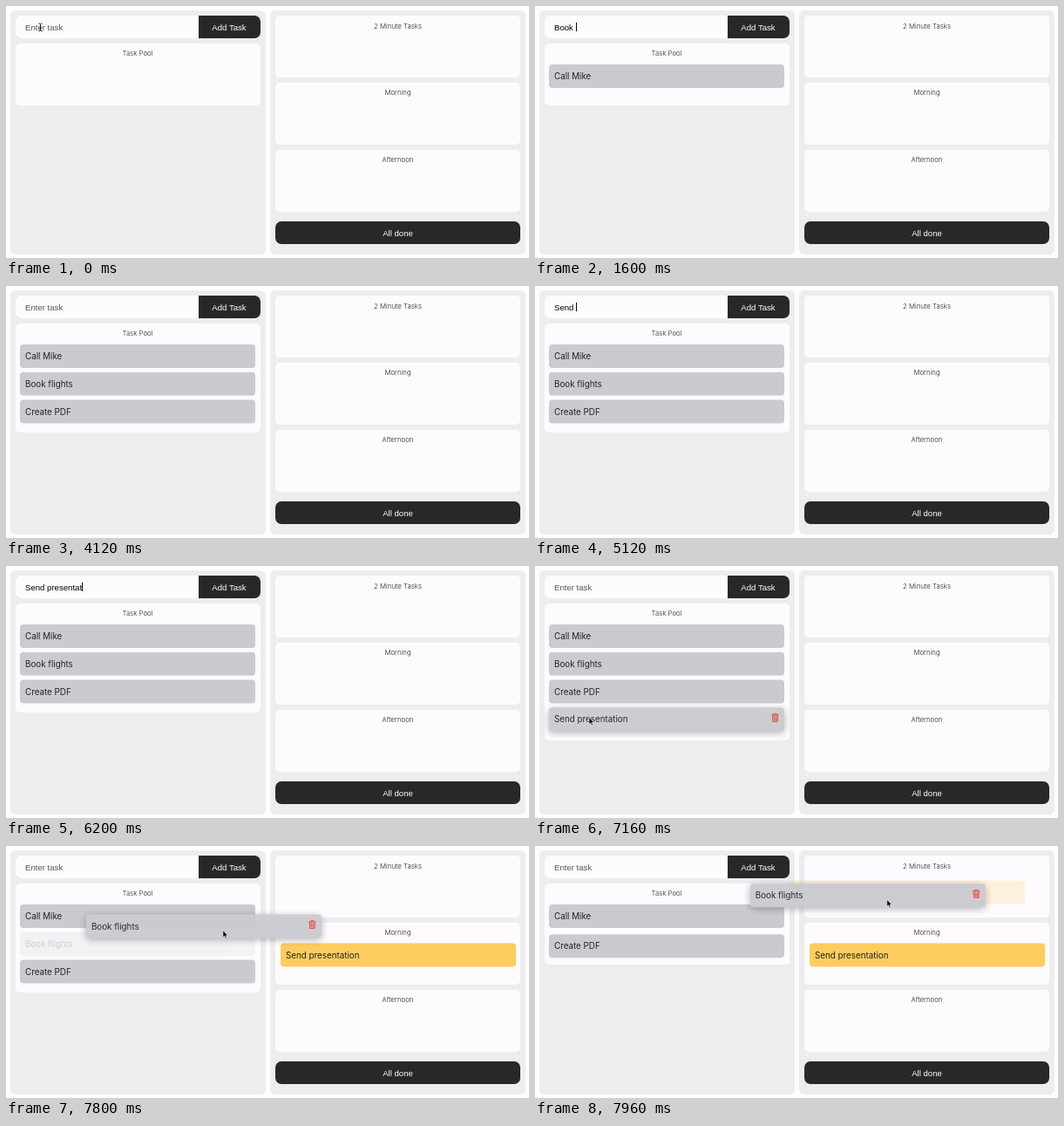
Write an HTML page that moves like this. It is 600 px wide and 289 px high and loops after 8000 ms.

```html
<!DOCTYPE html>
<html lang="en">
<head>
<meta charset="utf-8">
<title>Task planner</title>
<style>
  html, body { margin: 0; width: 100%; height: 100%; overflow: hidden; background: #fdfcfe; }
  #stage { position: relative; width: 600px; height: 289px; overflow: hidden; font-family: Inter, "Open Sans", sans-serif; }
  #stage > * { position: absolute; box-sizing: border-box; }
  .panel { top: 5px; width: 293px; height: 280px; border-radius: 6px; background: #eeecef; }
  .box { width: 281px; height: 71px; border-radius: 5px; background: #fdfbfe; padding-top: 6.5px;
    text-align: center; font-size: 7.8px; line-height: 10px; font-weight: 300; color: #2a272a; }
  .field, .button { height: 26px; display: flex; align-items: center; white-space: pre;
    font: 9.6px "Liberation Sans", Arial, sans-serif; }
  .field { left: 10.5px; top: 11px; width: 211px; padding-left: 11.5px; background: #fdfbfe; border-radius: 7px 0 0 7px; color: #000; }
  .button { justify-content: center; background: #2a272a; color: #fff; }
  #caret { width: 1px; height: 10px; margin-right: -1px; background: #000; }
  #hint { color: #555; }
  .task { left: 0; top: 0; width: 270px; height: 26.5px; padding-left: 6px; display: flex; align-items: center;
    border-radius: 4px; background: #cacbd0; color: #242226; font-size: 9.8px; white-space: pre; }
  .task.planned { background: #fccd5e; }
  .task.ghost { opacity: .2; }
  .task svg { position: absolute; left: 254.5px; top: 5.5px; display: none; }
  .task.hover svg, #drag svg { display: block; }
  #drag { opacity: .95; box-shadow: 0 2px 9px rgba(0, 0, 0, .3); z-index: 2; }
  #pointer, #beam { left: 0; top: 0; z-index: 3; overflow: visible; }
</style>
</head>
<body>
<div id="stage">
  <div class="panel" style="left:5px"></div>
  <div class="panel" style="left:303px"></div>
  <div class="field"><span id="typed"></span><i id="caret"></i><span id="hint">Enter task</span></div>
  <div class="button" style="left:220.5px;top:11px;width:71px;border-radius:0 7px 7px 0">Add Task</div>
  <div class="box" id="pool" style="left:10.5px;top:42.5px">Task Pool</div>
  <div class="box" style="left:309px;top:11px">2 Minute Tasks</div>
  <div class="box" style="left:309px;top:87.5px">Morning</div>
  <div class="box" style="left:309px;top:164.5px">Afternoon</div>
  <div class="button" style="left:309px;top:247px;width:281px;border-radius:7px">All done</div>
  <svg id="beam" width="6" height="10"><path d="M-2-4.5Q0-4.5 0-3V3Q0 4.5-2 4.5M2-4.5Q0-4.5 0-3V3Q0 4.5 2 4.5M-1 1H1" fill="none" stroke="#222" stroke-width=".9"/></svg>
  <svg id="pointer" width="8" height="10"><path d="M0 0V8L1.8 6.4 3 9.2 4.4 8.6 3.2 5.9H5.7Z" fill="#000" stroke="#fff" stroke-width=".6"/></svg>
</div>
<script>
const LOOP = 8000, FLIP = 150;
const $ = id => document.getElementById(id);
const stage = $("stage");
const TRASH = `<svg width="9" height="11" viewBox="0 0 9 11" fill="none" stroke="#e8463c">
  <path d="M.3 2.3H8.7M3 2V.8H6V2"/><path d="M1.4 2.5L1.8 10H7.2L7.6 2.5" fill="#e8463c" fill-opacity=".35"/><path d="M3.4 4V8.6M5.6 4V8.6" stroke-width=".8"/></svg>`;

const slot = i => [16, 67 + 31.8 * i];
const TWO_MINUTE = [315, 35], MORNING = [315, 111.5];

// born: added to pool; moved: reorder time; grab/drop: drag span
const tasks = [
  { text: "Call Mike", born: 1000, from: slot(0) },
  { text: "Book flights", born: 2640, from: slot(1), to: TWO_MINUTE, moved: 7860, grab: 7720, drop: LOOP },
  { text: "Create PDF", born: 4000, from: slot(2), to: slot(1), moved: 7860 },
  { text: "Send presentation", born: 6640, from: slot(3), to: MORNING, moved: 7365, grab: 7160, drop: 7540 }
];

// first key, last key, characters
const typing = [
  [120, 800, "Call Mike"],
  [1360, 1600, "Book "], [1960, 2240, "flight"], [2440, 2440, "s"],
  [2840, 3240, "Create"], [3320, 3320, " "], [3520, 3520, "P"], [3680, 3800, "DF"],
  [4480, 5120, "Send "], [5240, 5360, "pr"], [5560, 5920, "esen"], [6080, 6200, "tat"], [6320, 6480, "ion"]
];
const keys = typing.flatMap(([a, b, word]) =>
  [...word].map((char, i) => ({ char, at: a + (b - a) * i / Math.max(1, word.length - 1) })));
const caretOff = [[0, 120], [1200, 1360], [1800, 1960], [2760, 2840], [4040, 4200], [4400, 4480], [6720, LOOP]];

// time, x, y of the mouse
const path = [
  [6880, 39.5, 24.5], [7120, 62, 173.5], [7180, 62, 173.5], [7365, 310, 124], [7440, 374, 117.5],
  [7540, 392, 117], [7690, 173, 117], [7730, 173, 117], [7860, 312, 80], [7960, 403.5, 61.5], [8000, 414, 59]
];

const ease = u => 1 - Math.pow(1 - Math.min(1, Math.max(0, u)), 2.3);
const mix = (a, b, u) => a + (b - a) * u;
const place = (el, [x, y]) => { el.style.transform = `translate(${x}px,${y}px)`; };
const show = (el, on) => { el.style.visibility = on ? "visible" : "hidden"; };

function addTask(text) {
  const el = document.createElement("div");
  el.className = "task";
  el.innerHTML = `<span>${text}</span>${TRASH}`;
  return stage.appendChild(el);
}
for (const task of tasks) task.el = addTask(task.text);
const drag = addTask("");
drag.id = "drag";

function mouseAt(t) {
  if (t <= path[0][0]) return path[0].slice(1);
  const i = path.findIndex(p => p[0] >= t);
  const [a, b] = [path[i - 1], path[i]];
  const u = (t - a[0]) / (b[0] - a[0]);
  return [mix(a[1], b[1], u), mix(a[2], b[2], u)];
}

function positionAt(task, t) {
  if (!task.to) return task.from;
  const u = ease((t - task.moved) / FLIP);
  return task.from.map((v, i) => mix(v, task.to[i], u));
}

function drawField(t) {
  const cleared = Math.max(0, ...tasks.map(k => k.born).filter(b => b <= t));
  const text = keys.filter(k => k.at > cleared && k.at <= t).map(k => k.char).join("");
  $("typed").textContent = text;
  $("hint").style.display = text ? "none" : "";
  show($("caret"), !caretOff.some(([a, b]) => t >= a && t < b));
}

function drawTasks(t, mouse) {
  const held = tasks.find(k => t >= k.grab && t < k.drop);
  let pooled = 0;
  for (const task of tasks) {
    const { el } = task, born = t >= task.born;
    const pos = positionAt(task, t);
    const planned = task.grab && t >= task.moved;
    const dx = mouse[0] - pos[0], dy = mouse[1] - pos[1];
    const over = t > path[0][0] && dx > 0 && dx < 270 && dy > 0 && dy < 26.5;
    if (born && !planned) pooled++;
    el.style.display = born ? "" : "none";
    el.classList.toggle("planned", !!planned);
    el.classList.toggle("ghost", task === held);
    el.classList.toggle("hover", !held && over);
    place(el, pos);
  }
  $("pool").style.height = Math.max(71, 30 + 31.8 * pooled) + "px";
  show(drag, held);
  if (held) {
    const start = mouseAt(held.grab);
    drag.firstChild.textContent = held.text;
    place(drag, held.from.map((v, i) => v + mouse[i] - start[i]));
  }
}

function render(t) {
  const mouse = mouseAt(t);
  const active = t < 120 || t >= path[0][0];
  const inField = mouse[1] < 37;
  drawField(t);
  drawTasks(t, mouse);
  show($("beam"), active && inField);
  show($("pointer"), active && !inField);
  place($("beam"), mouse);
  place($("pointer"), mouse);
}

const began = performance.now();
function tick() {
  render((performance.now() - began) % LOOP);
  requestAnimationFrame(tick);
}
tick();
</script>
</body>
</html>
```
